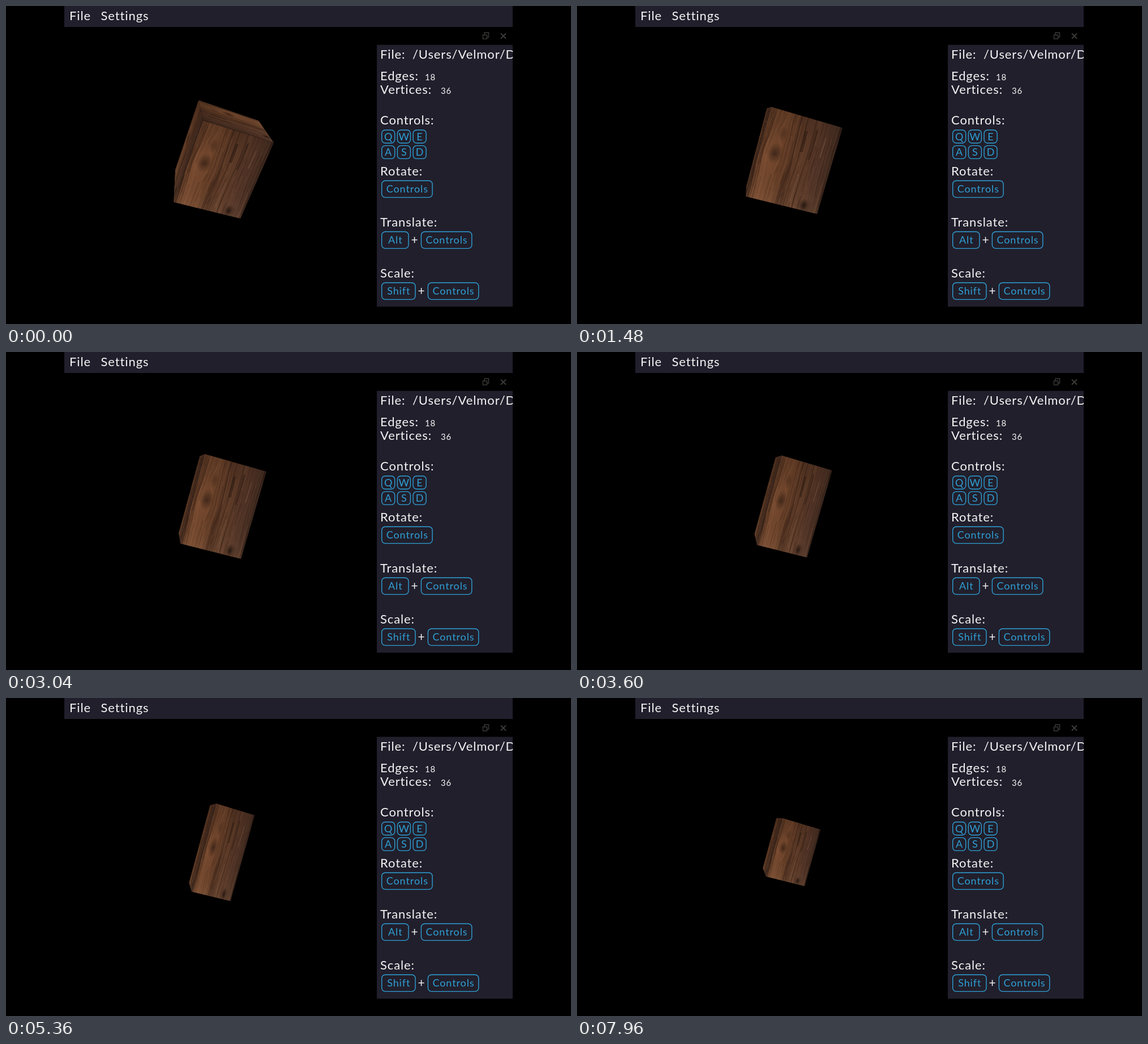
An HTML page with a canvas that plays this animation: 998x561 px, repeating every 8000 ms.

```html
<!DOCTYPE html>
<html lang="en">
<head>
<meta charset="utf-8">
<title>Model viewer</title>
<style>
html, body { margin: 0; width: 100%; height: 100%; overflow: hidden; background: #000; }
canvas { display: block; width: 100vw; height: 100vh; }
</style>
</head>
<body>
<canvas id="stage" width="998" height="561"></canvas>
<script>
const LOOP = 8000, STEP = 40;
const PANEL = '#211f2c', INK = '#f4f4f4', BLUE = '#2f9fd4';
const ctx = document.getElementById('stage').getContext('2d');

function makeCanvas(w, h) {
  const c = document.createElement('canvas');
  c.width = w;
  c.height = h;
  return c;
}

function seeded(s) {
  return () => (s = (s * 16807) % 2147483647) / 2147483647;
}

// Wood: vertical grain that bends around a few knots.
function makeWood(w, h) {
  const c = makeCanvas(w, h), g = c.getContext('2d'), rnd = seeded(77);
  const knots = [
    { u: .22, v: .47, r: .11, dark: .3 },
    { u: .26, v: .24, r: .08, dark: .14 },
    { u: .79, v: .94, r: .07, dark: .45 }
  ];
  const base = g.createLinearGradient(0, 0, w, 0);
  [[0, '#5c3926'], [.07, '#784b30'], [.3, '#70452b'], [.46, '#583624'],
   [.62, '#5c3a28'], [.8, '#553628'], [.93, '#493024'], [1, '#3c281f']].forEach(([p, col]) => base.addColorStop(p, col));
  g.fillStyle = base;
  g.fillRect(0, 0, w, h);

  const fade = g.createLinearGradient(0, 0, 0, h);
  fade.addColorStop(0, 'rgba(20,10,6,.22)');
  fade.addColorStop(.55, 'rgba(60,35,20,0)');
  fade.addColorStop(1, 'rgba(150,108,78,.25)');
  g.fillStyle = fade;
  g.fillRect(0, 0, w, h);

  function bend(u, v) {
    let x = u;
    for (const k of knots) {
      const du = u - k.u, dv = (v - k.v) / (k.r * 1.5);
      x += Math.sign(du) * k.r * .6 * Math.exp(-dv * dv - Math.abs(du) / k.r);
    }
    return x;
  }

  function grain(u, v0, v1, width, style) {
    const phase = u * 9;
    g.strokeStyle = style;
    g.lineWidth = width;
    g.beginPath();
    for (let v = v0; v <= v1 + .001; v += .02) {
      g.lineTo((bend(u, v) + .006 * Math.sin(v * 7 + phase)) * w, v * h);
    }
    g.stroke();
  }

  for (let i = 0; i < 230; i++) {
    const v0 = rnd() * 1.2 - .3, v1 = v0 + .15 + rnd() * .7, a = .05 + rnd() * .15;
    const tone = rnd() < .55 ? '24,14,10' : '150,104,74';
    grain(rnd(), v0, v1, .6 + rnd() * 1.8, `rgba(${tone},${a})`);
  }
  for (const u of [.08, .44, .53, .64, .97]) grain(u, 0, 1, 2, 'rgba(26,15,11,.35)');
  grain(.55, .14, .38, 5, 'rgba(24,14,10,.4)');
  grain(.68, .1, .44, 4, 'rgba(24,14,10,.32)');
  grain(.82, .15, .4, 2.5, 'rgba(145,106,78,.4)');
  grain(.6, .62, .95, 3, 'rgba(135,102,80,.3)');

  // Each knot is a soft dark blot.
  for (const k of knots) {
    const soft = g.createRadialGradient(0, 0, 0, 0, 0, 1);
    soft.addColorStop(0, `rgba(24,13,9,${k.dark * 1.8})`);
    soft.addColorStop(.45, `rgba(24,13,9,${k.dark})`);
    soft.addColorStop(1, 'rgba(24,13,9,0)');
    g.save();
    g.translate(k.u * w, k.v * h);
    g.scale(k.r * w, k.r * w * 1.4);
    g.fillStyle = soft;
    g.fillRect(-1, -1, 2, 2);
    g.restore();
  }
  return c;
}

function turned(src) {
  const c = makeCanvas(src.height, src.width), g = c.getContext('2d');
  g.setTransform(0, 1, 1, 0, 0, 0);
  g.drawImage(src, 0, 0);
  return c;
}

const wood = makeWood(144, 192), woodFlat = turned(wood);

function label(g, str, x, y, size = 22, color = INK, align = 'left') {
  g.font = `${size}px Lato, "Open Sans", sans-serif`;
  g.letterSpacing = '0.9px';
  g.textAlign = align;
  g.fillStyle = color;
  g.fillText(str, x, y);
}

function key(g, str, x, y, w, h) {
  g.strokeStyle = BLUE;
  g.lineWidth = 1.4;
  g.beginPath();
  g.roundRect(x, y, w, h, 6);
  g.stroke();
  label(g, str, x + w / 2 + .4, y + h / 2 + 6.5, 18, BLUE, 'center');
}

function makeUi() {
  const c = makeCanvas(998, 561), g = c.getContext('2d');
  g.fillStyle = PANEL;
  g.fillRect(103, 0, 792, 37);
  g.fillRect(655, 68.5, 240, 462);
  label(g, 'File', 112, 25);
  label(g, 'Settings', 167.5, 25);

  g.strokeStyle = '#3b3b39';
  g.lineWidth = 1.4;
  g.strokeRect(842.5, 51, 7, 7);
  g.beginPath();
  g.moveTo(845, 51); g.lineTo(845, 47); g.lineTo(852.5, 47); g.lineTo(852.5, 55); g.lineTo(850, 55);
  g.stroke();
  g.lineWidth = 2;
  g.beginPath();
  g.moveTo(874, 48.5); g.lineTo(883, 57.5);
  g.moveTo(883, 48.5); g.lineTo(874, 57.5);
  g.stroke();

  g.save();
  g.beginPath();
  g.rect(655, 69, 240, 462);
  g.clip();
  label(g, 'File:', 661, 93);
  label(g, '/Users/Velmor/D', 718, 93);
  g.restore();

  label(g, 'Edges:', 661, 131);
  label(g, '18', 740, 131, 15);
  label(g, 'Vertices:', 661, 155);
  label(g, '36', 768, 155, 15);

  label(g, 'Controls:', 661, 209);
  ['QWE', 'ASD'].forEach((row, r) =>
    [...row].forEach((ch, i) => key(g, ch, 663.7 + i * 27.7, 218.8 + r * 27.6, 23, 23)));

  label(g, 'Rotate:', 661, 299);
  key(g, 'Controls', 663.7, 308.3, 89.4, 29.3);
  label(g, 'Translate:', 661, 389);
  key(g, 'Alt', 663.7, 398.3, 47.3, 29.3);
  label(g, '+', 722, 420, 21, INK, 'center');
  key(g, 'Controls', 733.4, 398.3, 89.4, 29.3);
  label(g, 'Scale:', 661, 479);
  key(g, 'Shift', 663.7, 488.3, 59.3, 29.3);
  label(g, '+', 734, 510, 21, INK, 'center');
  key(g, 'Controls', 745.4, 488.3, 89.4, 29.3);
  return c;
}

const ui = makeUi();

// Front corners clockwise from top left, then back top left, top right, bottom left.
const tilted  = [348,202, 473,241, 414,375, 296,346, 340,166, 446,202, 299,288];
const turning = [343,187, 469,220, 424,370, 300,343, 334,177, 441,208, 299,307];
const facing  = [343,178, 469,215, 424,367, 298,336, 335,181, 437,212, 299,318];
const slimmer = [351,180, 460,211, 415,365, 308,338, 342,184, 430,212, 305,319];
const slim    = [372,185, 441,207, 397,360, 328,343, 359,189, 420,210, 322,322];
const shallow = [371,187, 438,207, 396,357, 328,341, 361,190, 420,210, 324,328];
const shorter = [368,192, 435,212, 395,350, 328,333, 358,195, 418,215, 324,320];
const short   = [363,212, 430,232, 402,332, 334,315, 352,212, 413,233, 328,300];

const keys = [
  [0, tilted], [1000, turning], [1480, facing], [2640, facing], [3040, slimmer],
  [4180, slim], [4700, slim], [5840, shallow], [6160, shallow],
  [6640, shorter], [7960, short], [LOOP, short]
];

function poseAt(t) {
  let i = 0;
  while (i < keys.length - 2 && t >= keys[i + 1][0]) i++;
  const [t0, a] = keys[i], [t1, b] = keys[i + 1];
  const f = (t - t0) / (t1 - t0);
  const flat = a.map((v, n) => v + (b[n] - v) * f);
  return Array.from({ length: 7 }, (_, n) => [flat[2 * n], flat[2 * n + 1]]);
}

const mix = (p, q, f) => [p[0] + (q[0] - p[0]) * f, p[1] + (q[1] - p[1]) * f];

function face(tex, quad, shade) {
  const [a, b, c, d] = quad, N = 6;
  const at = (u, v) => mix(mix(a, b, u), mix(d, c, u), v);
  const sw = tex.width / N, sh = tex.height / N;
  ctx.save();
  ctx.beginPath();
  quad.forEach(p => ctx.lineTo(p[0], p[1]));
  ctx.clip();
  for (let j = 0; j < N; j++) {
    for (let i = 0; i < N; i++) {
      const o = at(i / N, j / N), x = at((i + 1) / N, j / N), y = at(i / N, (j + 1) / N);
      ctx.setTransform(x[0] - o[0], x[1] - o[1], y[0] - o[0], y[1] - o[1], o[0], o[1]);
      ctx.drawImage(tex, i * sw, j * sh, sw, sh, -.02, -.02, 1.06, 1.06);
    }
  }
  ctx.setTransform(1, 0, 0, 1, 0, 0);
  ctx.fillStyle = `rgba(12,6,3,${shade})`;
  ctx.fillRect(0, 0, 998, 561);
  ctx.restore();
}

function draw(t) {
  const [tl, tr, br, bl, backTl, backTr, backBl] = poseAt(t);
  ctx.fillStyle = '#000';
  ctx.fillRect(0, 0, 998, 561);
  face(woodFlat, [backTl, backTr, tr, tl], .08);
  face(wood, [backTl, tl, bl, backBl], .15);
  face(wood, [tl, tr, br, bl], 0);
  ctx.drawImage(ui, 0, 0);
}

const start = performance.now();
function tick() {
  const t = (performance.now() - start) % LOOP;
  draw(Math.floor(t / STEP) * STEP);
  requestAnimationFrame(tick);
}
tick();
</script>
</body>
</html>
```
